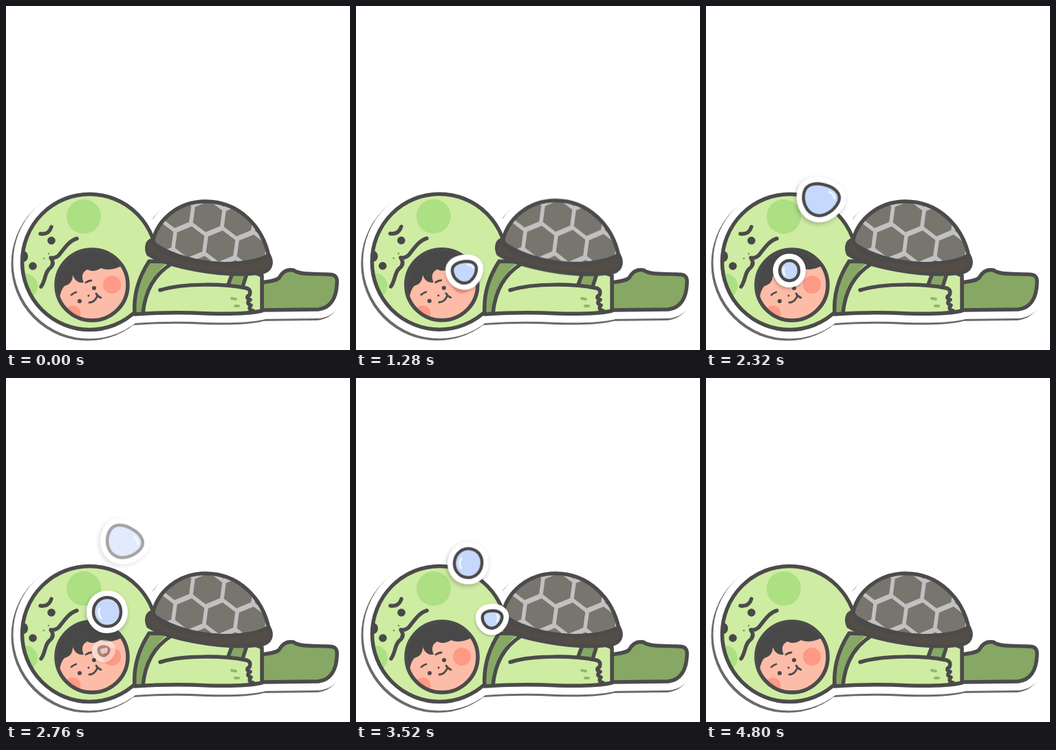
Write an HTML page that moves like this. It is 500 by 500 pixels and loops after 5000 ms.

```html
<!DOCTYPE html>
<html lang="en">
<head>
<meta charset="utf-8">
<title>Sleepy turtle</title>
<style>
  html, body { margin: 0; width: 100%; height: 100%; overflow: hidden; background: #fff; }
  svg { display: block; width: 100vw; height: 100vh; }
  .line { fill: none; stroke: #4b4b4b; stroke-width: 5.5; stroke-linecap: round; stroke-linejoin: round; }
  .rim { fill: #fff; stroke: #fff; stroke-width: 26; stroke-linejoin: round; }
  .sticker { filter: drop-shadow(-2.5px 3px .6px rgba(70, 70, 70, .8)); }
  .ink { fill: #484848; }
  .light { fill: #cfeca3; }
  .deep { fill: #87a864; }
  .spot { fill: #addf83; }
  .cheek { fill: #fd9985; }
  .bubble { filter: drop-shadow(-1px 3px 3px rgba(50, 60, 50, .32)); }
  .bubble path { vector-effect: non-scaling-stroke; stroke-linecap: round; }
  .halo { fill: #fff; stroke: #fff; stroke-width: 20; }
  .skin { fill: #c6d9fc; stroke: #4a4a4a; stroke-width: 4.5; }
  .shine { fill: none; stroke: #eef5ff; stroke-width: 3; }
</style>
</head>
<body>
<svg viewBox="0 0 500 500">
  <defs>
    <ellipse id="head" cx="121.500" cy="372" rx="98" ry="98.500"/>
    <ellipse id="face" cx="125" cy="405.500" rx="52" ry="51.500"/>
    <path id="leg" d="M372 402 C383 400 392 400 397 395 C402 386 409 382 418 384 C427 391 450 389 468 390 C479 390 482 394 481 404 C480 424 472 439 454 441 L372 442 Z"/>
    <path id="torso" d="M187 448 C185 420 193 394 208 371 L330 374 L372 392 V443 C350 448 310 448 270 446 C240 445 215 446 187 448 Z"/>
    <path id="dome" d="M213 344 C219 311 250 284 290 284 C338 284 373 320 382 364 C340 384 255 376 213 344 Z"/>
    <path id="base" d="M213 340 C204 342 203 353 207 361 C235 379 315 395 368 388 C386 386 388 373 382 362 C362 374 322 377 288 373 C252 369 222 361 213 340 Z"/>
    <clipPath id="inHead"><use href="#head"/></clipPath>
    <clipPath id="inFace"><use href="#face"/></clipPath>
    <clipPath id="inTorso"><use href="#torso"/></clipPath>
    <clipPath id="inDome"><use href="#dome"/></clipPath>
  </defs>

  <g class="sticker">
    <use class="rim headPart" href="#head"/>
    <use class="rim" href="#leg"/>
    <use class="rim" href="#torso"/>
    <g class="rim shellPart"><use href="#dome"/><use href="#base"/></g>
  </g>

  <g class="headPart">
    <use class="light" href="#head"/>
    <g clip-path="url(#inHead)">
      <circle class="spot" cx="113" cy="306" r="25"/>
      <circle class="spot" cx="28" cy="407" r="18"/>
      <ellipse class="ink" cx="25" cy="364" rx="7" ry="8"/>
    </g>
    <use class="line" href="#head"/>
    <path class="line" d="M50 331 Q62 333 66 321"/>
    <circle class="ink" cx="66" cy="341" r="5.800"/>
    <circle class="ink" cx="39" cy="378" r="5.800"/>
    <g fill="#6f9850">
      <circle cx="62" cy="360" r="1.300"/><circle cx="55" cy="367" r="1.300"/><circle cx="65" cy="375" r="1.100"/>
    </g>
    <path class="line" stroke-width="5" d="M103 338 C92 341 85 352 77 362 Q72 367 65 366 Q71 374 65 380 C56 386 58 398 51 408"/>
    <g clip-path="url(#inFace)">
      <use href="#face" fill="#fdbca7"/>
      <circle class="cheek" cx="154" cy="405" r="13"/>
      <circle class="cheek" cx="97" cy="447" r="11.500"/>
      <path class="ink" d="M65 345 H190 L172 375 C161 383 147 385 138 381 C131 386 124 386 118 383 C111 387 109 393 113 402 C105 403 100 399 97 391 C97 402 91 405 85 407 C80 412 79 419 77 428 L65 425 Z"/>
    </g>
    <use class="line" href="#face"/>
    <circle class="ink" cx="107" cy="429" r="3"/>
    <circle class="ink" cx="128" cy="410" r="3"/>
    <circle class="ink" cx="120" cy="421" r="1.500"/>
    <g class="line" style="stroke-width:2.8">
      <path d="M95 420 Q98 417 102 416 M116 402 Q120 399 124 399"/>
      <path d="M121 431 Q129 431 133 421 M131 418 Q133 422 138 424"/>
    </g>
  </g>

  <use class="deep" href="#leg"/>
  <use class="line" href="#leg"/>

  <use class="light" href="#torso"/>
  <g clip-path="url(#inTorso)">
    <path class="deep" d="M180 452 V365 H246 C218 382 202 410 199 452 Z"/>
    <path class="deep" d="M331 382 L323 405 L344 408 L352 384 Z"/>
    <path class="line" d="M240 375 C216 390 202 415 199 447 M330 386 L323 405 M351 386 L344 408"/>
  </g>
  <use class="line" href="#torso"/>
  <path class="line" d="M224 413 C260 402 320 404 349 410 Q357 412 354 420 Q347 424 355 427 Q348 432 356 435 Q351 441 359 443"/>
  <path d="M328 425 L334 426 M333 436 L338 436" fill="none" stroke="#8eba6a" stroke-width="4" stroke-linecap="round"/>

  <g class="shellPart">
    <use href="#dome" fill="#c1c1c1"/>
    <g clip-path="url(#inDome)"><path id="hexes" fill="#78756e"/></g>
    <use class="line" href="#dome"/>
    <use href="#base" fill="#544d46"/>
    <use class="line" href="#base"/>
  </g>

  <g id="bubbles"></g>
</svg>
<script>
const LOOP = 5000, STEP = 40, LAST = 4800;
const $ = s => document.querySelector(s);
const headParts = document.querySelectorAll('.headPart');
const shellParts = document.querySelectorAll('.shellPart');

// Tilted honeycomb on the shell
function hexagon(cx, cy, r, tilt) {
  const pts = [];
  for (let i = 0; i < 6; i++) {
    const a = tilt + Math.PI / 6 + i * Math.PI / 3;
    pts.push((cx + r * Math.cos(a)).toFixed(1) + ' ' + (cy + r * Math.sin(a)).toFixed(1));
  }
  return 'M' + pts.join('L') + 'Z';
}
let comb = '';
for (let row = -1; row < 3; row++) {
  for (let col = -2; col < 5; col++) {
    comb += hexagon(293 + 45 * col - 26 * row, 306 + 6 * col + 37 * row, 23, 0.133);
  }
}
$('#hexes').setAttribute('d', comb);

const EGG = 'M-26 -5 C-26 -18 -13 -23 1 -23 C17 -23 27 -16 26 -5 C24 9 12 23 -1 23 C-16 23 -26 8 -26 -5 Z';
const ROUND = 'M-20 0 C-20 -12 -11 -21 0 -21 C12 -21 20 -12 20 0 C20 12 12 21 0 21 C-11 21 -20 12 -20 0 Z';

// Keys: time, x, y, scale, rotation, opacity
const bubbles = [
  { shape: EGG, shine: 'M9 -15 Q17 -14 19 -8', keys: [
    [1080, 151, 404, .2, -12, 0], [1180, 154, 397, .48, -10, 1], [1280, 158, 387, .68, -8, 1],
    [1880, 162, 325, 1, 0, 1], [2680, 170, 247, 1, 28, 1], [2840, 172, 231, 1, 32, 0]] },
  { shape: ROUND, shine: 'M-11 -5 Q-14 3 -9 9', keys: [
    [2120, 110, 402, .2, 0, 0], [2220, 115, 394, .5, 0, 1], [2400, 126, 377, .85, 0, 1],
    [2760, 147, 340, 1, 0, 1], [3520, 163, 269, 1, 10, 1], [3740, 166, 249, 1, 12, 1], [3900, 168, 236, 1, 14, 0]] },
  { shape: EGG, shine: 'M13 -13 Q18 -5 12 5', keys: [
    [2700, 139, 400, .15, 0, 0], [2760, 142, 397, .28, 0, .45], [2860, 151, 390, .4, 0, 1],
    [3520, 198, 351, .55, 0, 1], [3960, 187, 314, .7, 8, 1], [4520, 176, 265, .8, 18, 1],
    [4640, 175, 259, .8, 20, 1], [4800, 174, 254, .8, 22, 0]] }
];
for (const b of bubbles) {
  b.el = document.createElementNS('http://www.w3.org/2000/svg', 'g');
  b.el.setAttribute('class', 'bubble');
  b.el.innerHTML = `<path class="halo" d="${b.shape}"/><path class="skin" d="${b.shape}"/><path class="shine" d="${b.shine}"/>`;
  $('#bubbles').append(b.el);
}

function sample(keys, t) {
  const i = keys.findIndex(k => k[0] > t);
  if (i < 1) return null;
  const a = keys[i - 1], b = keys[i], p = (t - a[0]) / (b[0] - a[0]);
  return a.map((v, j) => v + (b[j] - v) * p);
}

const ease = p => p < .5 ? 2 * p * p : 1 - 2 * (1 - p) ** 2;

function breath(t) {
  if (t < 640) return ease(t / 640);
  return t < 1680 ? 1 - ease((t - 640) / 1040) : 0;
}

function draw(t) {
  const k = breath(t);
  headParts.forEach(e => e.setAttribute('transform', `translate(${-.8 * k} ${-.9 * k})`));
  shellParts.forEach(e => e.setAttribute('transform', `translate(0 ${-388 * .042 * k}) scale(1 ${1 + .042 * k})`));
  for (const b of bubbles) {
    const s = sample(b.keys, t);
    b.el.style.display = s ? '' : 'none';
    if (!s) continue;
    b.el.setAttribute('transform', `translate(${s[1]} ${s[2]}) rotate(${s[4]}) scale(${s[3]})`);
    b.el.style.opacity = s[5];
  }
}

const start = performance.now();
function tick() {
  const t = (performance.now() - start) % LOOP;
  draw(Math.min(LAST, Math.floor(t / STEP) * STEP));
  requestAnimationFrame(tick);
}
tick();
</script>
</body>
</html>
```
